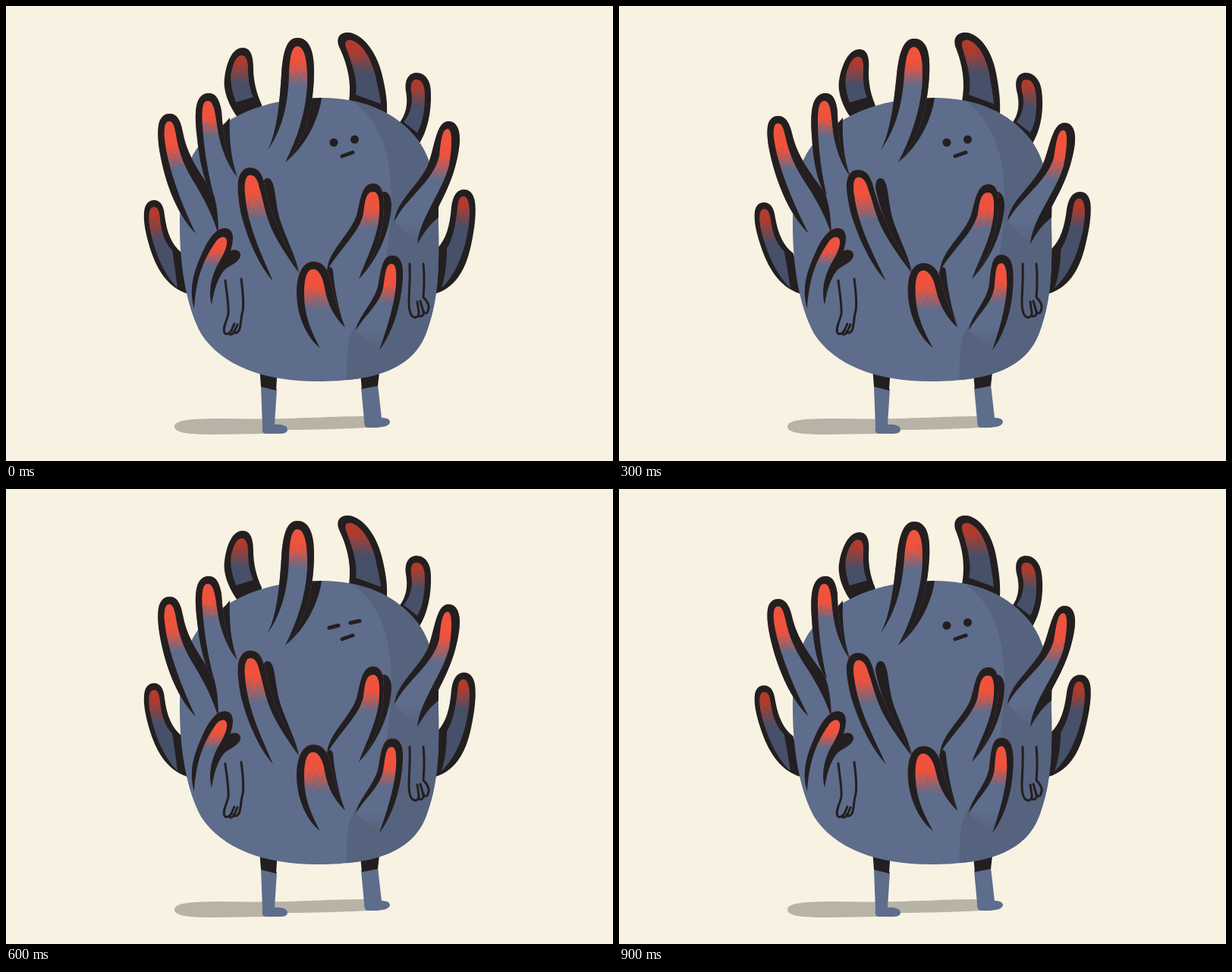
These frames come from a looping animation (800x600 px, 1 s). An HTML page with a canvas:

```html
<!DOCTYPE html>
<html lang="en">
<head>
<meta charset="utf-8">
<title>Wiggly creature</title>
<style>
html, body { margin: 0; width: 100%; height: 100%; overflow: hidden; background: #f8f2e2; }
canvas { display: block; }
</style>
</head>
<body>
<canvas id="stage" width="800" height="600"></canvas>
<script>
const ctx = document.getElementById('stage').getContext('2d');
const INK = '#231f20', BLUE = '#5e6d8c', SHADE = '#56637f', NAVY = '#475069';
const RED = '#ef533d', RUST = '#b03c2d', STEP = 100, LOOP = 1000;

const BODY = 'M415 121 C470 121 515 140 543 177 C564 206 569 245 570 290 C571 345 570 385 556 425 C540 477 490 495 410 495 C340 495 284 474 257 432 C237 395 229 340 229 290 C229 245 235 205 258 180 C297 138 355 121 415 121 Z';
const SIDE = 'M449 500 C448 450 450 430 470 410 C496 375 506 325 508 255 C508 190 490 147 450 120 L600 120 L600 500 Z';
const SHADOW = 'M222 555 C222 546 240 544 290 544 C370 546 420 541 474 541 L476 556 C440 558 400 559 368 559 L342 564 L275 565 C240 565 223 563 222 555 Z';

// outer: rim from base to base; inner: its return edge or a closed core.
// red: y where the tip colour starts and stops fading; bend: tip offset.
const back = [
  { outer: 'M306 148 C291 128 286 108 288 95 C291 72 299 55 312 55 C324 55 326 70 326 82 C326 98 330 115 337 130 L337 148',
    inner: 'M303 127 C297 110 295 98 297 87 C300 74 304 65 311 65 C317 65 319 74 319 84 C319 100 322 112 326 120 Z',
    tip: [310, 55], red: [74, 103], bend: [5, 2] },
  { outer: 'M452 126 C456 100 449 75 440 56 C433 41 441 34 452 35 C470 37 488 60 495 88 C500 108 503 125 502 142 L470 134',
    inner: 'M461 117 C464 98 456 76 449 57 C445 48 448 44 455 45 C468 48 481 68 487 92 C490 108 493 118 494 129 Z',
    tip: [463, 35], red: [60, 88], bend: [6, 0] },
  { outer: 'M517 156 C528 143 530 128 527 112 C525 97 531 88 541 88 C553 88 560 99 560 114 C561 140 555 165 545 181',
    inner: 'M524 153 C533 142 537 128 534 113 C533 102 535 97 541 97 C549 97 552 106 552 118 C552 138 549 155 542 167 Z',
    tip: [543, 88], red: [106, 133], bend: [-5, 0] },
  { outer: 'M245 381 C214 374 199 348 190 320 C184 300 181 285 182 272 C183 261 188 256 195 256 C204 256 208 264 209 276 C212 300 219 315 231 325',
    inner: 'M226 372 C206 352 195 320 190 295 C187 276 188 265 195 265 C201 265 202 272 203 280 C205 302 211 314 219 322 C222 340 224 356 226 372 Z',
    tip: [197, 256], red: [280, 311], bend: [-4, 3] },
  { outer: 'M560 381 C592 374 606 348 613 315 C618 292 620 272 618 258 C616 246 610 242 604 242 C594 242 589 250 587 265 C585 290 580 308 568 320',
    inner: 'M574 372 C593 354 604 325 609 295 C613 272 611 251 603 251 C597 251 596 258 595 266 C593 290 588 308 581 320 C581 340 579 356 574 372 Z',
    tip: [602, 242], red: [264, 291], bend: [4, 3] }
];

const front = [
  { outer: 'M250 300 C228 278 212 240 204 200 C200 180 199 163 202 153 C205 145 210 142 216 142 C227 142 231 155 233 166 C238 195 254 218 272 244 C278 258 280 280 280 302',
    inner: 'C274 280 262 256 250 236 C236 214 228 195 224 170 C222 158 220 152 215 152 C209 152 208 163 209 175 C212 205 226 250 250 300 Z',
    tip: [219, 142], red: [187, 215], bend: [-6, 3] },
  { outer: 'M274 250 C261 235 255 205 252 175 C249 150 249 135 253 125 C257 117 262 115 267 115 C277 115 281 123 284 138 C286 172 292 205 305 226',
    inner: 'C295 214 283 190 279 163 C276 145 275 125 266 125 C258 125 258 140 259 158 C261 190 267 225 274 250 Z',
    fold: 'M284 160 L295 147 C294 175 296 200 305 226 C296 212 288 195 284 175 Z',
    tip: [267, 115], red: [150, 170], bend: [5, 0] },
  { outer: 'M345 190 C358 165 361 120 363 90 C365 60 370 42 384 42 C400 42 406 60 406 85 C406 125 398 175 368 206',
    inner: 'C384 175 395 140 397 105 C398 75 394 53 384 53 C376 53 374 70 373 90 C372 125 366 160 345 190 Z',
    fold: 'M400 122 L416 121 C412 150 395 185 368 206 C385 180 395 150 400 122 Z',
    tip: [385, 42], red: [77, 105], bend: [5, 1] },
  { outer: 'M352 363 C332 340 318 306 310 275 C306 255 304 235 307 226 C310 217 315 213 322 213 C333 213 338 222 341 236 C346 262 355 285 366 310 C376 328 382 340 386 352',
    inner: 'C376 338 362 318 352 298 C341 275 339 255 334 240 C332 229 328 223 322 223 C315 223 314 235 315 247 C318 290 338 330 352 363 Z',
    fold: 'M338 240 C338 228 343 225 348 228 C355 235 354 252 360 278 C366 300 380 325 386 350 C374 330 348 290 338 240 Z',
    tip: [325, 213], red: [250, 280], bend: [-7, 3] },
  { outer: 'M423 349 C425 322 453 302 462 276 C467 258 468 234 484 234 C495 234 498 246 498 262 C498 295 488 335 465 360',
    inner: 'C475 333 490 305 492 275 C493 255 491 245 484 245 C474 245 473 258 471 274 C466 298 442 318 423 349 Z',
    fold: 'M494 246 C500 242 508 247 508 262 C507 295 490 335 465 360 C478 335 490 300 494 246 Z',
    tip: [482, 234], red: [268, 293], bend: [3, 1] },
  { outer: 'M414 451 C394 435 383 405 383 378 C383 352 392 337 405 337 C419 337 425 349 428 362 C432 385 440 405 447 424',
    inner: 'C434 412 424 395 420 372 C418 358 412 347 405 347 C396 347 393 360 393 380 C393 410 404 432 414 451 Z',
    fold: 'M422 352 C423 343 430 341 431 350 C433 375 440 405 446 422 C434 405 426 380 422 352 Z',
    tip: [406, 337], red: [370, 399], bend: [-4, 2] },
  { outer: 'M461 428 C465 408 484 392 490 370 C494 350 495 329 509 329 C521 329 524 342 523 358 C521 395 510 430 492 454',
    inner: 'C500 430 511 400 514 368 C515 350 514 340 508 340 C500 340 500 355 497 372 C492 394 474 406 461 428 Z',
    tip: [506, 329], red: [367, 392], bend: [-5, -1], fade: [425, 450] },
  { outer: 'M248 399 C239 368 251 342 262 318 C270 303 278 293 288 293 C298 293 301 302 298 315 L296 323 C304 319 310 324 309 330 C307 338 295 342 288 348 C279 358 274 375 271 394',
    inner: 'C265 368 275 347 284 332 C289 323 292 315 291 309 C289 302 282 304 277 310 C265 328 251 350 248 399 Z',
    tip: [278, 293], red: [323, 342], bend: [0, 0] },
  { outer: 'M512 284 C514 258 542 238 555 212 C565 190 566 152 583 152 C597 152 600 170 597 188 C592 222 580 245 570 265 L570 279 C558 288 550 300 542 314',
    inner: 'C545 280 575 245 584 210 C588 188 589 162 582 162 C574 162 573 182 571 198 C563 232 528 252 512 284 Z',
    tip: [577, 152], red: [197, 230], bend: [4, 2], fade: [283, 310] }
];

function fill(path, color) {
  ctx.fillStyle = color;
  ctx.fill(new Path2D(path));
}

function line(path, width) {
  ctx.strokeStyle = INK;
  ctx.lineWidth = width;
  ctx.lineCap = ctx.lineJoin = 'round';
  ctx.stroke(new Path2D(path));
}

function dot(x, y, r) {
  ctx.beginPath();
  ctx.arc(x, y, r, 0, 7);
  ctx.fill();
}

function random(seed) {
  return () => (seed = seed * 16807 % 2147483647) / 2147483647;
}

// Shift points sideways, more towards the tip.
function bent(path, f, k) {
  const base = +f.outer.match(/^M\d+ (\d+)/)[1];
  return path.replace(/(\d+) (\d+)/g, (_, x, y) => {
    const w = k * Math.min(1, Math.max(0, (base - y) / (base - f.tip[1]))) ** 1.3;
    return (+x + f.bend[0] * w).toFixed(2) + ' ' + (+y + f.bend[1] * w).toFixed(2);
  });
}

function paintTip(path, f, k, red, skin) {
  const [a, b] = f.red, rnd = random(f.tip[0] * 97 + f.tip[1]);
  ctx.save();
  ctx.clip(new Path2D(path));
  const [end, gone] = f.fade || [599, 600];
  const g = ctx.createLinearGradient(0, 0, 0, 600);
  g.addColorStop(0, red);
  g.addColorStop(a / 600, red);
  g.addColorStop(b / 600, skin);
  g.addColorStop(end / 600, skin);
  g.addColorStop(gone / 600, f.fade ? skin + '00' : skin);
  ctx.translate(f.bend[0] * k * 0.7, f.bend[1] * k * 0.7);
  ctx.fillStyle = g;
  ctx.fillRect(-20, -20, 840, 640);
  ctx.globalAlpha = 0.6;
  for (let i = 0; i < 420; i++) {
    const t = rnd(), x = f.tip[0] + (rnd() - 0.5) * 54;
    ctx.fillStyle = rnd() > t ? red : skin;
    ctx.fillRect(x, a - 5 + t * (b - a + 9), 1.4, 1.2);
  }
  ctx.restore();
}

function backFinger(f, k) {
  fill(bent(f.outer, f, k) + 'Z', INK);
  paintTip(bent(f.inner, f, k), f, k, RUST, NAVY);
}

function frontFinger(f, k) {
  const outer = bent(f.outer, f, k);
  if (f.fold) fill(f.fold, INK);
  paintTip(outer + 'Z', f, k, RED, BLUE);
  fill(outer + bent(f.inner, f, k), INK);
}

function legs() {
  fill('M336 501 L357 505 L354 552 C365 551 371 554 371 559 C370 564 365 564 355 564 L343 564 C338 564 337 560 338 555 Z', BLUE);
  fill('M468 503 L490 499 L495 543 C502 543 506 545 506 549 C505 554 496 556 485 556 L477 556 C473 556 472 552 472 546 Z', BLUE);
  fill('M334 475 L358 475 L356 507 L336 502 Z', INK);
  fill('M466 475 L493 475 L490 501 L469 505 Z', INK);
}

function arms() {
  line('M289 362 C291 380 294 395 293 406 C291 416 285 424 288 431 C290 434 295 432 297 428 L301 419', 3);
  line('M310 360 C312 375 314 390 312 402 C309 412 310 422 307 428 C304 432 301 432 300 429', 3);
  line('M294 432 C297 435 301 431 302 427 L305 420', 3);
  line('M532 340 C533 360 531 380 531 390 C531 400 533 408 537 410 C541 412 545 409 544 403 L542 390', 3);
  line('M550 340 C552 358 551 372 550 384 C556 390 559 396 556 402 C555 406 552 406 550 403 L546 389', 3);
  line('M545 409 C549 410 551 407 550 402', 3);
}

function face(closed) {
  line('M443 198 L457 193', 5);
  if (closed) {
    line('M426 183 L438 180', 5);
    line('M454 176.5 L466 174', 5);
  } else {
    ctx.fillStyle = INK;
    dot(432, 180, 5.5);
    dot(459.5, 176, 5.5);
  }
}

function draw(step) {
  const k = step % 2;
  ctx.fillStyle = '#f8f2e2';
  ctx.fillRect(0, 0, 800, 600);
  fill(SHADOW, '#b7b3a6');
  legs();
  back.forEach(f => backFinger(f, k));
  fill(BODY, BLUE);
  ctx.save();
  ctx.clip(new Path2D(BODY));
  fill(SIDE, SHADE);
  ctx.restore();
  front.forEach(f => frontFinger(f, k));
  arms();
  face(step >= 6 && step <= 8);
}

let shown = -1;
function tick() {
  const step = Math.floor(performance.now() % LOOP / STEP);
  if (step !== shown) draw(shown = step);
  requestAnimationFrame(tick);
}
tick();
</script>
</body>
</html>
```
